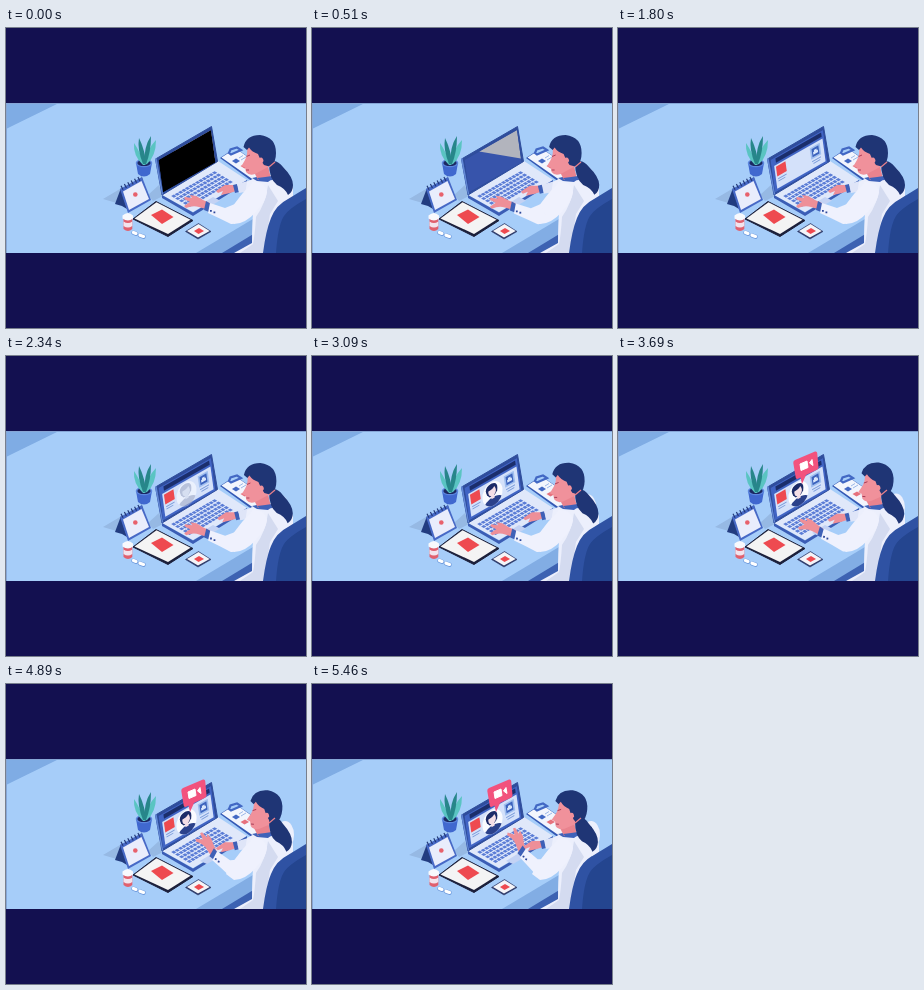
Write an HTML page that moves like this. It is 300 px wide and 300 px high and loops after 7170 ms.

```html
<!DOCTYPE html>
<html lang="en">
<head>
<meta charset="utf-8">
<style>
html, body { margin: 0; width: 100%; height: 100%; overflow: hidden; background: #131050; }
svg { display: block; width: 100vw; height: 100vh; }
</style>
</head>
<body>
<svg viewBox="0 0 300 300">
<defs>
  <clipPath id="band"><rect y="75" width="300" height="150"/></clipPath>
  <clipPath id="display"><rect width="100" height="100"/></clipPath>
  <clipPath id="photo"><ellipse cx="48" cy="62" rx="19" ry="35"/></clipPath>
</defs>
<g clip-path="url(#band)">
  <path fill="#a6cdf9" d="M0 75H300V225H0z"/>
  <path fill="#7face4" d="M0 75H53L0 101z"/>
  <path fill="none" stroke="#86a6d6" d="M300 75.500H.5V225"/>
  <path fill="#82ade4" d="M190 225L252 188L256 206L220 225z"/>
  <path fill="#3d62b2" d="M216 225L254 202L262 210L238 225z"/>
  <path fill="#96b9e4" d="M97 171L114 161V176zM142 167L153 157L157 168L147 173z"/>

  <!-- plant -->
  <path fill="#4068cf" d="M130 135L132 146Q138 151 144 146L146 135z"/>
  <ellipse cx="138" cy="135" rx="8.3" ry="4.3" fill="#5c86de"/>
  <ellipse cx="138" cy="135" rx="6.6" ry="3.1" fill="#1b2863"/>
  <g fill="#5ac4c2">
    <path d="M137 137Q127 128 128 115Q134 124 139 137z"/>
    <path d="M138 137Q141 121 150 112Q150 128 141 136z"/>
  </g>
  <g fill="#27868a">
    <path d="M137 136Q131 121 133 110Q139 122 140 136z"/>
    <path d="M138 136Q138 118 145 108Q145 124 140 136z"/>
  </g>

  <!-- calendar -->
  <path fill="#223c80" d="M109 176L115 160L121 181L116 178z"/>
  <path fill="#4769c6" d="M114 161L136 149L145 172L122 185z"/>
  <path fill="#e9edfc" d="M117 163.500L135.500 153L143 171L123 182z"/>
  <path fill="none" stroke="#223878" stroke-width="4.500" stroke-dasharray="1.200 2.600" d="M115.500 160L136 149.500"/>
  <circle cx="129.300" cy="166.500" r="2.300" fill="#e8616c"/>

  <!-- pills -->
  <path fill="#e0606e" d="M117.500 190V201Q122 205 126.300 201V190z"/>
  <path fill="#f3e3ec" d="M117.500 193.500Q122 196.500 126.300 193.500V198Q122 201 117.500 198z"/>
  <path fill="#f8f9fd" d="M116.500 187.500V190.500Q122 194.500 127 190.500V187.500Q122 182.500 116.500 187.500z"/>
  <g fill="none" stroke-linecap="round">
    <path stroke="#6f9bdd" stroke-width="4.400" d="M127.500 204.800L130 205.700M134 207.500L137.500 208.700"/>
    <path stroke="#fff" stroke-width="3.200" d="M127.500 204.500L130 205.400M134 207.200L137.500 208.400"/>
  </g>

  <!-- tablet and phone -->
  <g stroke-linejoin="round">
    <path fill="#1b1f3a" stroke="#1b1f3a" d="M127 191L150 173.500L187 192.500L162 208.500z"/>
    <path fill="#f4f4f4" d="M128.500 190.500L150.500 174.300L184.500 191.800L162 206z"/>
    <path fill="#ee4a50" d="M145 187L156 181.500L167.500 189L156 196z"/>
    <path fill="#2c3867" stroke="#2c3867" stroke-width=".6" d="M179.500 203.500L192.500 195.500L205 203.500L192 211z"/>
    <path fill="#f4f4f8" d="M181 203L192.500 196L203.700 203L192 209.500z"/>
    <path fill="#ee4a50" d="M188 203L193 200L198 203L192.500 206z"/>
  </g>

  <!-- clipboard -->
  <path fill="#3358b4" d="M214 130L229 120L262 142L247 154z"/>
  <path fill="#f2f5fd" d="M215.500 129.500L229.500 120.500L261 142L247 151.500z"/>
  <path fill="#a6cdf9" stroke="#4268c4" stroke-width="2.200" d="M223 125L224.500 121.500L231 119.500L235 122L225 126.500z"/>
  <path fill="#4268c4" d="M226 133L230 130.500L234 133L230 135.500z"/>
  <path fill="#e6717d" d="M234.500 138L239 135.500L243 138L238.500 140.500z"/>
  <path stroke="#9db8e8" d="M233 130L237 127.500M235 132L240 129"/>

  <!-- laptop -->
  <path fill="#e0e8fa" d="M156 167L212 133L241 152L187 184z"/>
  <path fill="#3b5db5" d="M156 167L187 184.500L241 152V154.500L187 188L156 170z"/>
  <g transform="matrix(.435 -.25 .195 .115 165 168)">
    <path id="keys" fill="none" stroke="#5b7dd6" stroke-width="14" stroke-dasharray="6.100 1.700"/>
  </g>
  <path fill="#c3d2f4" d="M194 177L207 169L214 172.500L201 180z"/>
  <path fill="#2f4d9c" stroke="#2f4d9c" stroke-linejoin="round" d="M149.500 131L205.500 98.500L211.500 133.500L156 167z"/>
  <path fill="#6389d6" d="M149 131L150.500 130L157 165.500L156 167z"/>
  <g transform="matrix(.525 -.3 .045 .325 152.500 132)" clip-path="url(#display)">
    <path fill="#3754ab" d="M0 0H100V100H0z"/>
    <path id="glare" fill="#b2b4bd" d="M28 0H100V88z"/>
    <g id="page">
      <path fill="#4064c4" d="M0 0H100V100H0z"/>
      <path fill="#1b2e6c" d="M9 4H96V17H9z"/>
      <path fill="#d4e1fa" d="M5 23H97V93H5z"/>
      <path fill="#ee4a50" d="M8 28H26V58H8z"/>
      <path stroke="#7c9ddb" stroke-width="3" d="M9 66H25M9 73H22M73 73H90M75 80H88"/>
      <path fill="#a0bfef" d="M72 31H91V66H72z"/>
      <path fill="#3c63bd" d="M75 36H88V61H75z"/>
      <path fill="#d8e6fc" d="M79 42H84V47H86V55H77V47H79z"/>
    </g>
    <g id="caller">
      <ellipse cx="48" cy="62" rx="19" ry="35" fill="#fafbff"/>
      <g clip-path="url(#photo)">
        <path class="dark" d="M38 58Q33 32 48 31Q62 34 57 60L52 68H42z"/>
        <path class="coat" d="M26 100Q30 78 43 73H53Q66 77 70 100z"/>
        <path class="face" d="M41 49Q50 50 53 43Q58 60 51 67V76H45V67Q40 62 41 49z"/>
      </g>
    </g>
    <path id="off" d="M0 0H100V100H0z"/>
  </g>

  <g id="bubble">
    <path fill="#f2527d" d="M177 104L197 95.500Q199 95 199.200 97L200.500 111Q200.500 113 199 113.800L188 119L184 128L182.500 121.500L179.500 123Q178 123 177.700 121.500L175.300 107Q175 105 177 104z"/>
    <path fill="#fff" stroke="#fff" stroke-linejoin="round" d="M182 108L189 105L190 111.500L183 114.500zM191.500 107L194 103.500L195 109.500z"/>
  </g>

  <!-- woman -->
  <g id="farArm">
    <path fill="#ee8f98" d="M228 157L219 157Q214 160 210 163L212 165L217 163L215 167L224 165L230 163z"/>
    <path fill="#3e60b7" d="M227 157L231 156L233 164L229 165z"/>
    <path fill="#dfe5f8" d="M231 156L245 152L250 162L233 165z"/>
  </g>
  <ellipse id="shoulder" cx="274" cy="153" rx="9" ry="14" fill="#eceffc"/>
  <path fill="#eceffc" d="M241 154Q252 147 266 147Q282 146 287 160V178L262 225H228L246 215Q246 196 247 186L238 172z"/>
  <path fill="#d4dbf0" d="M262 157Q260 175 250 189Q249 206 247 216L234 225H258L264 186L272 173z"/>
  <path fill="#3f62b9" d="M246 150L256 148L266 151L262 154L251 153z"/>
  <path fill="#e9838e" d="M247 142L262 138L265 151L252 152z"/>
  <path fill="#3f62b9" d="M251 150Q260 149 266 148L267 152L254 153z"/>
  <g id="head">
    <path fill="#f0919b" d="M241 119Q242 127 239 132L235.500 138L239 139.500L240 144Q243 148 249 146L262 139L264 120z"/>
    <path stroke="#a33552" stroke-width=".9" fill="none" d="M240.500 128.500L244 127M240 142L243 142"/>
    <path fill="#1f3575" d="M237.500 119Q240 107 254 107Q270 109 270 125Q270 134 265 139L258 137Q254 132 252 126Q246 124 243 119.500L241 122z"/>
    <path fill="#f0919b" d="M253 130Q257 128 257.500 133Q256 137 253 135z"/>
  </g>
  <path id="tail" fill="#1f3575" d="M263 135Q270 130 277 139Q287 149 287 157Q287 164 282 167Q279 160 271 157Q263 151 263 135z"/>
  <path stroke="#e9808a" stroke-width="1.200" d="M263 139L269 134"/>
  <path fill="#eff1fd" d="M247 154Q259 153 261 164Q260 174 250 184Q239 196 228 196L220 190L226 179Q236 165 247 154z"/>
  <g id="nearArm">
    <path id="hand" fill="#ee8f98" d="M203 182L193 179Q187 177 180 180L178 178L184 174L178 171L179 169L186 170L184 167L190 168L197 172L204 175z"/>
    <path fill="#3e60b7" d="M200 173L205 176L203 184L198 182z"/>
    <path fill="#eff1fd" d="M204 175L219 180L229 176L234 188Q231 197 225 196Q213 190 202 185z"/>
    <path fill="#2d479a" d="M204 182h1.800v1.800h-1.800zM207.500 183.500h1.800v1.800h-1.800z"/>
  </g>
  <path fill="#2f52a3" d="M257 225Q260 202 265 190Q270 177 282 171L300 160V225z"/>
  <path fill="#24458f" d="M270 225Q272 197 278 188Q282 181 300 171V225z"/>
</g>
</svg>
<script>
const $ = id => document.getElementById(id);
const LOOP = 7170;
const PAUSE = [3600, 3930];

$("keys").setAttribute("d", [8, 28, 48, 68, 88].map(y => `M0 ${y}H100`).join(""));

const ramp = (t, a, b) => {
  const p = Math.min(1, Math.max(0, (t - a) / (b - a)));
  return p * p * (3 - 2 * p);
};
const mix = (a, b, p) => a + (b - a) * p;
const fade = (id, v) => $(id).setAttribute("opacity", v);
const pose = (id, v) => $(id).setAttribute("transform", v);
const tint = (name, from, to, p) => {
  const rgb = from.map((c, i) => Math.round(mix(c, to[i], p)));
  document.querySelector("." + name).setAttribute("fill", `rgb(${rgb})`);
};

function draw(t) {
  fade("off", 1 - ramp(t, 30, 480));
  fade("glare", 1 - ramp(t, 720, 1000));
  fade("page", ramp(t, 720, 1150));
  fade("caller", ramp(t, 2160, 2480));

  const live = ramp(t, 2500, 2960);
  tint("dark", [164, 174, 199], [28, 43, 104], live);
  tint("coat", [164, 174, 199], [43, 65, 139], live);
  tint("face", [215, 221, 235], [244, 222, 230], live);

  const pop = ramp(t, 3150, 3540);
  pose("bubble", `translate(184 128) scale(${pop}) translate(-184 -128)`);

  // The woman rests briefly once the call comes in.
  const [stop, go] = PAUSE;
  const clock = t < stop ? t : Math.max(stop, t - go + stop);
  const beat = Math.sin(t * Math.PI / 360) * (1 - ramp(t, 3300, stop));
  const lean = ramp(clock, 2500, 4070);
  const raise = ramp(clock, 3300, 4070);
  const point = ramp(t, 4500, 5400);

  pose("head", `translate(${.4 * beat + 5.5 * lean - 1.8 * point} ${-.6 * lean}) rotate(${5 * lean} 256 143)`);
  pose("tail", `rotate(${.6 * beat + 3 * lean} 265 137)`);
  pose("shoulder", `translate(${5 * lean} ${-2 * lean})`);
  pose("farArm", `translate(${1.2 * beat - raise + 2 * point} ${-.8 * beat + 2 * raise - 2 * point})`);
  pose("nearArm", `translate(${2 * raise + point} ${-raise - point}) rotate(${beat + 13 * raise + 9 * point} 228 188)`);
  pose("hand", `rotate(${18 * raise + 12 * point} 201 178)`);
}

function tick(now) {
  draw(now % LOOP);
  requestAnimationFrame(tick);
}
draw(0);
requestAnimationFrame(tick);
</script>
</body>
</html>
```
